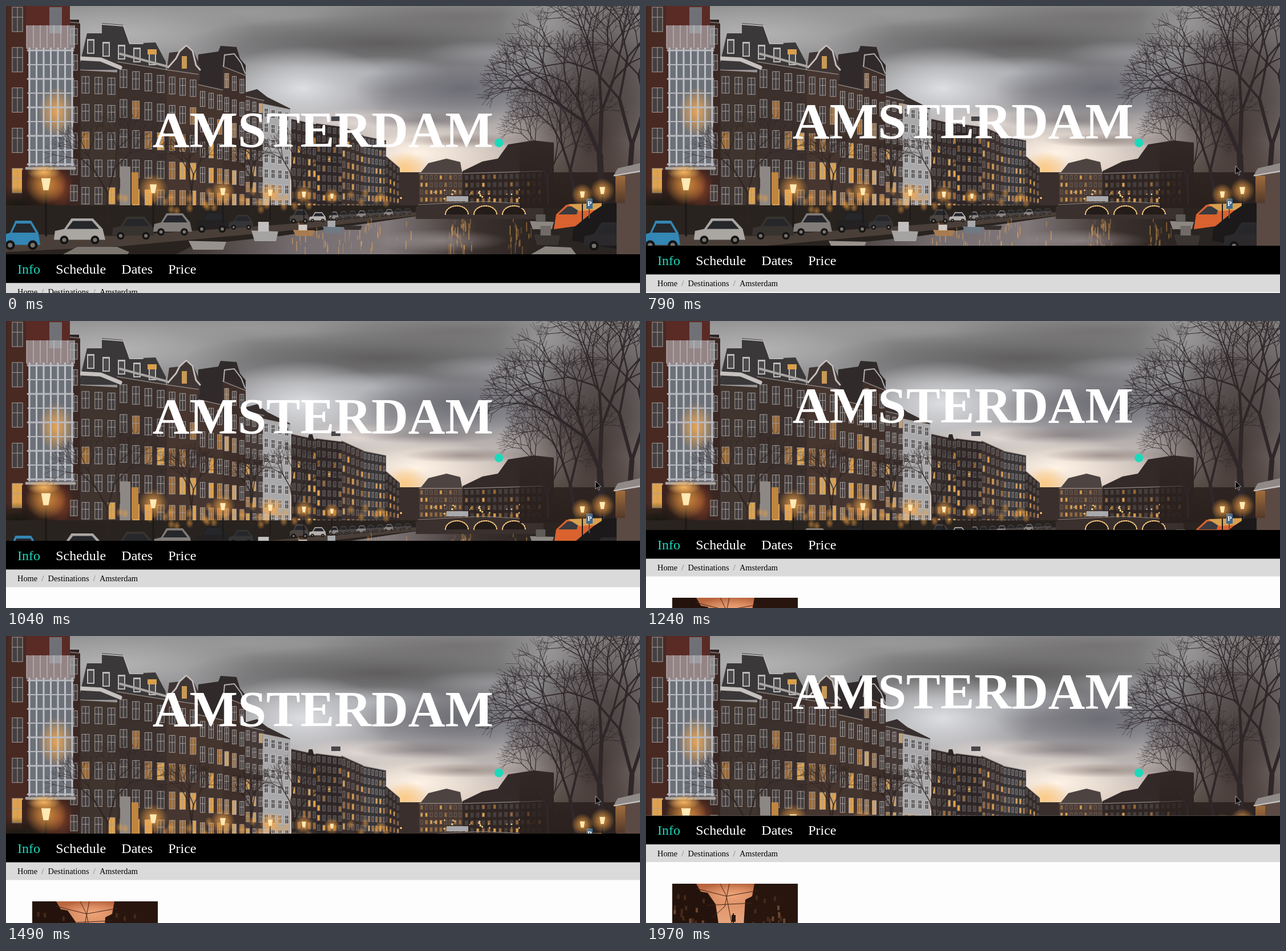
These frames come from a looping animation (1111 by 504 pixels, 2 s). An HTML page with a canvas:

```html
<!DOCTYPE html>
<html lang="en">
<head>
<meta charset="utf-8">
<title>Amsterdam</title>
<style>
  html, body { margin: 0; height: 100%; overflow: hidden; background: #fdfdfd; }
  canvas { display: block; }
</style>
</head>
<body>
<canvas id="stage" width="1111" height="504"></canvas>
<script>
const W = 1111, H = 504, LOOP = 2000, TEAL = '#1dd8bb';
const SERIF = '"Liberation Serif", "Times New Roman", serif';
const stage = document.getElementById('stage').getContext('2d');

let seed = 11;
const rnd = () => (seed = seed * 16807 % 2147483647) / 2147483647;
const lerp = (a, b, u) => a + (b - a) * u;

function layer(w, h) {
  const canvas = document.createElement('canvas');
  canvas.width = w;
  canvas.height = h;
  return canvas.getContext('2d');
}

function poly(c, fill, ...pts) {
  c.fillStyle = fill;
  c.beginPath();
  for (let i = 0; i < pts.length; i += 2) c.lineTo(pts[i], pts[i + 1]);
  c.fill();
}

function line(c, color, width, ...pts) {
  c.strokeStyle = color;
  c.lineWidth = width;
  c.beginPath();
  for (let i = 0; i < pts.length; i += 2) c.lineTo(pts[i], pts[i + 1]);
  c.stroke();
}

function rect(c, fill, x, y, w, h) {
  c.fillStyle = fill;
  c.fillRect(x, y, w, h);
}

function disc(c, fill, x, y, r) {
  c.fillStyle = fill;
  c.beginPath();
  c.arc(x, y, r, 0, 7);
  c.fill();
}

function glow(c, x, y, rx, ry, rgb, alpha) {
  const g = c.createRadialGradient(0, 0, 0, 0, 0, 1);
  g.addColorStop(0, `rgba(${rgb},${alpha})`);
  g.addColorStop(0.5, `rgba(${rgb},${alpha * 0.55})`);
  g.addColorStop(1, `rgba(${rgb},0)`);
  c.save();
  c.translate(x, y);
  c.scale(rx, ry);
  rect(c, g, -1, -1, 2, 2);
  c.restore();
}

function gradient(c, x0, y0, x1, y1, ...colors) {
  const g = c.createLinearGradient(x0, y0, x1, y1);
  colors.forEach((color, i) => g.addColorStop(i / (colors.length - 1), color));
  return g;
}

// Wall between x0 and x1 with a sloping top and a grid of framed windows; lower rows are lit.
function facade(c, x0, x1, top0, top1, bottom, fill, cols, rows, lit = 0.5, frame = '#a39c98') {
  poly(c, fill, x0, top0, x1, top1, x1, bottom, x0, bottom);
  const cw = (x1 - x0) / cols;
  for (let i = 0; i < cols; i++) {
    const x = x0 + cw * (i + 0.2), top = lerp(top0, top1, (i + 0.5) / cols);
    const rh = (bottom - top) / rows;
    for (let j = 0; j < rows; j++) {
      const y = top + rh * (j + 0.22), w = cw * 0.6, h = rh * 0.62;
      const on = rnd() < lit * (j + 0.5) / rows * 1.6;
      rect(c, frame, x, y, w, h);
      rect(c, on ? (rnd() < 0.4 ? '#e0a24c' : '#9a6a38') : '#443f40', x + 1, y + 1, w - 2, h - 2);
      if (cw > 11) {
        rect(c, frame, x + w / 2 - 0.5, y, 1, h);
        rect(c, frame, x, y + h * 0.4, w, 1);
      }
    }
  }
  line(c, 'rgba(190,180,175,.6)', 1.5, x0, top0, x1, top1);
}

function branch(c, color, x, y, angle, length, width, depth) {
  const ex = x + Math.cos(angle) * length, ey = y + Math.sin(angle) * length;
  line(c, color, width, x, y, ex, ey);
  if (!depth) return;
  const forks = depth > 3 ? 2 : 3;
  for (let i = 0; i < forks; i++) {
    const turn = (i - (forks - 1) / 2) * 0.62 + (rnd() - 0.5) * 0.5;
    branch(c, color, ex, ey, angle + turn, length * (0.7 + rnd() * 0.2), width * 0.66, depth - 1);
  }
}

function car(c, x, bottom, w, h, color) {
  const y = bottom - h;
  poly(c, color, x, bottom - h * 0.15, x + w * 0.02, y + h * 0.5, x + w * 0.2, y + h * 0.42, x + w * 0.34, y,
    x + w * 0.76, y, x + w * 0.95, y + h * 0.42, x + w, bottom - h * 0.15);
  poly(c, '#25272b', x + w * 0.25, y + h * 0.42, x + w * 0.37, y + h * 0.1, x + w * 0.74, y + h * 0.1, x + w * 0.88, y + h * 0.42);
  for (const u of [0.2, 0.8]) {
    disc(c, '#151414', x + w * u, bottom - h * 0.14, h * 0.17);
    disc(c, '#77736f', x + w * u, bottom - h * 0.14, h * 0.08);
  }
}

function boat(c, x, y, w, h, hull, cabin) {
  poly(c, hull, x, y + h * 0.45, x + w, y + h * 0.5, x + w * 0.92, y + h, x + w * 0.12, y + h);
  if (cabin) rect(c, cabin, x + w * 0.25, y, w * 0.4, h * 0.5);
}

function lamp(c, x, y, size, foot) {
  line(c, '#1d1918', size / 4, x, y, x, foot);
  glow(c, x, y, size * 2.4, size * 2.4, '255,170,70', 0.8);
  poly(c, '#ffe9b5', x - size * 0.55, y - size * 0.7, x + size * 0.55, y - size * 0.7, x + size * 0.3, y + size * 0.7, x - size * 0.3, y + size * 0.7);
}

function paintSky(c) {
  rect(c, gradient(c, 0, 0, 0, 330, '#8f8e8e', '#88888a', '#9a9a9e', '#c9bfba', '#e4cdbb'), 0, 0, W, H);
  glow(c, 190, 50, 250, 60, '190,190,191', 0.8);
  glow(c, 420, 12, 200, 26, '158,157,157', 0.7);
  glow(c, 660, 65, 350, 50, '88,86,87', 0.85);
  glow(c, 790, 18, 260, 32, '105,103,103', 0.7);
  glow(c, 960, 30, 100, 60, '160,159,160', 0.7);
  glow(c, 520, 145, 160, 75, '225,226,229', 0.95);
  glow(c, 650, 118, 130, 30, '190,193,198', 0.7);
  glow(c, 800, 145, 190, 60, '105,105,113', 0.9);
  glow(c, 850, 82, 120, 22, '165,165,170', 0.6);
  glow(c, 620, 205, 120, 26, '230,220,215', 0.9);
  glow(c, 740, 200, 130, 16, '125,118,121', 0.7);
  glow(c, 720, 258, 150, 56, '255,243,230', 1);
  glow(c, 805, 236, 110, 13, '140,126,122', 0.7);
  glow(c, 700, 285, 42, 30, '255,200,125', 0.9);
}

function paintFarBank(c) {
  rect(c, '#3a2f2c', 660, 292, 451, 80);
  poly(c, '#4d4442', 724, 296, 740, 276, 772, 268, 796, 274, 800, 296);
  facade(c, 724, 800, 294, 294, 346, '#4a3a33', 9, 4, 0.8, '#6d5c50');
  poly(c, '#332a29', 800, 290, 835, 273, 862, 268, 880, 243, 925, 236, 960, 240, 960, 350, 800, 350);
  facade(c, 802, 940, 294, 290, 348, '#2f2624', 14, 4, 0.5, '#4a3d38');
  for (let i = 0; i < 26; i++) disc(c, '#ffd28a', 690 + rnd() * 250, 322 + rnd() * 18, 0.8 + rnd());
}

function paintHouses(c) {
  facade(c, 500, 545, 198, 208, 362, '#352c2b', 5, 8, 0.6, '#6b6361');
  facade(c, 543, 590, 206, 212, 362, '#2f2727', 5, 9, 0.5, '#685f5e');
  facade(c, 588, 628, 210, 228, 362, '#3b302d', 5, 8, 0.6, '#756b68');
  facade(c, 626, 666, 228, 236, 362, '#383537', 6, 8, 0.5, '#8c8789');
  facade(c, 664, 690, 262, 284, 362, '#332a29', 4, 6, 0.6, '#5d5350');
  rect(c, '#46464b', 570, 194, 16, 8);
  poly(c, '#2d2626', 528, 210, 531, 199, 537, 199, 540, 210);

  poly(c, '#38302f', 418, 152, 440, 146, 458, 160, 498, 180, 498, 200, 418, 200);
  facade(c, 418, 452, 158, 166, 360, '#443936', 3, 7, 0.5);
  facade(c, 450, 498, 172, 182, 360, '#a9a9ab', 4, 7, 0.15, '#c9c9ca');

  poly(c, '#302a2b', 335, 140, 337, 85, 372, 80, 376, 70, 404, 72, 410, 92, 420, 104, 420, 155);
  line(c, '#b5b0ae', 2, 381, 108, 383, 86, 400, 84, 412, 100, 419, 118);
  facade(c, 337, 382, 138, 148, 362, '#45352f', 3, 5, 0.8);
  facade(c, 380, 420, 106, 122, 362, '#3f2f2a', 3, 6, 0.75);

  poly(c, '#3e3534', 282, 110, 286, 82, 304, 80, 316, 67, 328, 78, 340, 106, 340, 130, 282, 130);
  line(c, '#c4bebb', 3, 284, 108, 298, 92, 304, 80, 316, 69, 327, 79, 333, 104, 340, 112);
  rect(c, '#c99a55', 308, 88, 9, 22);
  facade(c, 282, 337, 112, 120, 362, '#473630', 3, 5, 0.9);

  poly(c, '#3a3839', 130, 100, 142, 48, 168, 48, 168, 30, 205, 33, 216, 66, 262, 64, 280, 98, 280, 112, 130, 112);
  line(c, '#b9b7b7', 2, 168, 32, 206, 35, 217, 66, 240, 66);
  for (let i = 0; i < 5; i++) {
    const x = 142 + i * 27, y = 58 + i * 5;
    rect(c, '#bdbbba', x, y, 13, 26);
    rect(c, '#4b4a4c', x + 2, y + 3, 9, 21);
  }
  rect(c, '#d9a04d', 248, 76, 16, 9);
  facade(c, 128, 196, 112, 116, 356, '#40342f', 3, 5, 0.15);
  facade(c, 195, 282, 98, 112, 362, '#3c302d', 4, 5, 0.5);
  line(c, '#c5c1be', 7, 130, 92, 166, 94, 200, 108);
  line(c, '#aaa5a2', 4, 200, 84, 282, 106);
  rect(c, '#8d8884', 200, 282, 18, 72);
  rect(c, '#c0853e', 220, 292, 12, 56);
}

function paintCornerHouse(c) {
  rect(c, '#43261f', 0, 0, 112, 350);
  rect(c, '#2b2423', 110, 24, 18, 326);
  facade(c, 108, 130, 28, 30, 350, '#3a2622', 1, 7, 0.1);
  facade(c, 4, 36, -14, -14, 340, '#492a23', 1, 5, 0.5);
  rect(c, '#5a2b25', 36, 0, 76, 80);
  rect(c, '#707176', 76, 2, 22, 46);
  rect(c, 'rgba(180,180,184,.65)', 36, 34, 84, 42);
  for (let x = 36; x <= 120; x += 12) line(c, '#c9c7c6', 1, x, 34, x, 74);
  rect(c, '#6c7079', 39, 76, 78, 206);
  glow(c, 88, 186, 32, 44, '245,170,80', 0.9);
  for (let x = 41; x <= 117; x += 12.5) line(c, '#c0c1c6', 3, x, 74, x, 280);
  for (let y = 78; y < 290; y += 25) line(c, '#b9bac0', y % 2 ? 2 : 3, 38, y, 118, y);
  line(c, '#aaa4a0', 5, 36, 285, 120, 285);
  rect(c, '#3b221d', 28, 288, 84, 62);
  glow(c, 66, 292, 30, 12, '255,200,120', 0.9);
  glow(c, 96, 320, 24, 36, '190,90,50', 0.5);
  glow(c, 20, 352, 60, 34, '22,23,18', 1);
}

function paintWater(c) {
  rect(c, '#29231f', 0, 350, W, H - 350);
  poly(c, '#4a3f38', 0, 400, 200, 404, 480, 384, 720, 362, 720, 368, 480, 396, 200, 422, 0, 432);
  poly(c, gradient(c, 200, 0, 980, 0, '#2b2421', '#4a413f', '#756d70', '#81787a', '#3a302d', '#241f1d'),
    160, H, 330, 420, 480, 404, 720, 369, 940, 369, 960, 400, 1000, H);
  glow(c, 760, 412, 120, 20, '170,160,162', 0.6);
  for (let i = 0; i < 110; i++) {
    const x = i < 45 ? 500 + rnd() * 210 : rnd() < 0.6 ? 774 + rnd() * 42 : 876 + rnd() * 44;
    rect(c, `rgba(245,175,85,${0.2 + rnd() * 0.45})`, x, 370 + rnd() * 55, 1.5, 5 + rnd() * 16);
  }
}

function paintBridge(c) {
  c.fillStyle = '#3a312f';
  c.beginPath();
  c.moveTo(718, 352);
  c.quadraticCurveTo(835, 338, 942, 352);
  c.lineTo(942, 374);
  c.lineTo(718, 374);
  c.fill();
  for (const x of [790, 840, 890]) {
    c.beginPath();
    c.ellipse(x, 366, 20, 15, 0, Math.PI, 0);
    c.fillStyle = '#241c19';
    c.fill();
    c.setLineDash([2, 2]);
    c.strokeStyle = '#ffce80';
    c.lineWidth = 2;
    c.stroke();
    c.setLineDash([]);
  }
  line(c, '#8e8580', 1, 722, 349, 835, 343, 940, 349);
  rect(c, '#a8a9ad', 772, 334, 38, 9);
}

function paintStreet(c) {
  for (let i = 0; i < 34; i++) glow(c, 190 + rnd() * 480, 325 + rnd() * 35, 7, 9, '240,160,65', 0.55);
  car(c, -6, 427, 66, 50, '#3486b4');
  car(c, 84, 417, 90, 44, '#aaa6a2');
  car(c, 186, 409, 74, 39, '#37332f');
  car(c, 258, 402, 68, 38, '#817c79');
  car(c, 331, 397, 60, 37, '#232122');
  car(c, 390, 392, 44, 25, '#353436');
  car(c, 497, 381, 34, 24, '#4b4542');
  car(c, 531, 379, 30, 17, '#b5b1ae');
  for (let i = 0; i < 9; i++) car(c, 566 + i * 16, 376 - i * 1.2, 17, 15 - i * 0.5, i % 3 ? '#4b4644' : '#8b8683');
  boat(c, 320, 400, 66, 28, '#98928d');
  boat(c, 430, 379, 47, 34, '#a5a3a1', '#c2c0be');
  boat(c, 503, 384, 38, 20, '#a87c50', '#d0cac2');
  boat(c, 555, 377, 34, 22, '#6e7a84', '#a7aaad');
  boat(c, 590, 379, 34, 14, '#37302d');
  poly(c, '#7c7670', 100, 436, 125, 423, 195, 423, 216, 432, 210, 440);
}

function paintRightBank(c) {
  const brown = '#30272a';
  glow(c, 1030, 230, 165, 190, '50,38,35', 0.9);
  glow(c, 1060, 120, 130, 170, '62,50,48', 0.6);
  rect(c, gradient(c, 0, 235, 0, 350, 'rgba(38,29,27,0)', '#2a201d'), 900, 235, 211, 120);
  branch(c, brown, 1045, 350, -1.62, 88, 11, 7);
  branch(c, brown, 1090, 340, -1.5, 95, 9, 7);
  branch(c, brown, 1000, 350, -1.75, 62, 6, 6);
  branch(c, brown, 950, 345, -1.6, 42, 4, 6);
  poly(c, '#2a2422', 935, 368, 1111, 350, 1111, H, 1000, H);
  boat(c, 918, 366, 42, 26, '#8d8782', '#5f5b59');
  boat(c, 925, 386, 46, 34, '#3a3432', '#716b67');
  poly(c, '#8b8580', 920, 436, 945, 422, 990, 424, 1002, 440);
  poly(c, '#d9622f', 960, 392, 964, 366, 982, 349, 1046, 347, 1046, 380);
  poly(c, '#3a3a3f', 968, 366, 984, 352, 1004, 352, 1000, 366);
  poly(c, '#d8a04f', 985, 348, 1046, 346, 1040, 358, 1004, 360);
  poly(c, '#1b191a', 992, 412, 994, 390, 1030, 360, 1050, 347, 1088, 345, 1088, 430);
  car(c, 1012, 428, 92, 48, '#2b292b');
  rect(c, '#5b4a43', 1070, 292, 41, 150);
  rect(c, gradient(c, 0, 295, 0, 350, '#a56f3d', '#4c3529'), 1068, 298, 17, 48);
  poly(c, '#8f8a88', 1064, 299, 1072, 285, 1111, 276, 1111, 292);
  line(c, '#c9c5c2', 2, 1066, 298, 1111, 290);
  line(c, '#55504e', 2, 1022, 350, 1022, 372);
  rect(c, '#3b6a94', 1017, 338, 11, 18);
  c.fillStyle = '#fff';
  c.font = 'bold 12px ' + SERIF;
  c.fillText('P', 1019, 351);
}

function paintPhoto() {
  const c = layer(W, 440);
  c.lineCap = 'round';
  paintSky(c);
  paintFarBank(c);
  paintHouses(c);
  paintCornerHouse(c);
  paintWater(c);
  paintBridge(c);
  for (const [x, y, size] of [[178, 380, 52], [325, 365, 38], [430, 365, 38], [505, 362, 38]])
    branch(c, 'rgba(45,36,34,.8)', x, y, -1.57, size, 4, 5);
  paintStreet(c);
  paintRightBank(c);
  for (const [x, y, size] of [[70, 313, 15], [258, 321, 11], [380, 326, 9], [463, 328, 8], [522, 331, 7], [571, 334, 6], [1010, 331, 8], [1045, 324, 9]])
    lamp(c, x, y, size, y + size * 6);
  return c.canvas;
}

function paintThumb() {
  const c = layer(220, 90);
  rect(c, gradient(c, 0, 0, 0, 90, '#b5613a', '#e29a70', '#e9ad88'), 0, 0, 220, 90);
  glow(c, 105, 20, 60, 22, '245,170,125', 0.9);
  poly(c, '#24130c', 0, 0, 42, 0, 50, 14, 62, 16, 76, 36, 84, 90, 0, 90);
  poly(c, '#27150e', 220, 0, 144, 0, 140, 22, 128, 28, 124, 90, 220, 90);
  for (let i = 0; i < 40; i++) {
    const x = i % 2 ? rnd() * 60 : 140 + rnd() * 75;
    rect(c, i % 3 ? '#46291b' : '#6b4631', x, 18 + rnd() * 68, 4, 8);
  }
  line(c, '#43251a', 1, 40, 8, 95, 22, 150, 12);
  line(c, '#43251a', 1, 84, 0, 95, 22, 108, 90);
  line(c, '#43251a', 1, 100, 0, 92, 40, 70, 60);
  line(c, '#43251a', 1, 60, 38, 140, 34);
  line(c, '#2b1710', 2, 107, 52, 107, 90);
  rect(c, '#2b1710', 104, 55, 7, 12);
  return c.canvas;
}

const photo = paintPhoto(), thumb = paintThumb();

const scrollKeys = [[560, 0], [790, 15], [1040, 50], [1240, 69], [1490, 89], [1720, 107.5], [1970, 120.5], [2200, 128]];

// Smooth cubic through the scroll keys.
function scrollAt(t) {
  if (t <= scrollKeys[0][0]) return 0;
  const slope = i => {
    if (i === 0) return 0;
    const a = scrollKeys[i - 1], b = scrollKeys[Math.min(i + 1, scrollKeys.length - 1)];
    return (b[1] - a[1]) / (b[0] - a[0]);
  };
  const i = scrollKeys.findIndex(k => k[0] > t) - 1;
  const [t0, y0] = scrollKeys[i], [t1, y1] = scrollKeys[i + 1];
  const d = t1 - t0, u = (t - t0) / d, v = 1 - u;
  return v * v * (1 + 2 * u) * y0 + u * u * (3 - 2 * u) * y1 + d * u * v * (v * slope(i) - u * slope(i + 1));
}

function words(items, x, y, size, gap) {
  stage.font = `${size}px ${SERIF}`;
  for (const [text, color] of items) {
    stage.fillStyle = color;
    stage.fillText(text, x, y);
    x += stage.measureText(text).width + gap;
  }
}

function drawCursor(t) {
  if (t < 40) return;
  const v = 1 - Math.min(1, (t - 40) / 430), e = 1 - v * v;
  stage.save();
  stage.translate(lerp(1083, 1033, e), lerp(480, 281, e));
  poly(stage, '#000', 0, 0, 0, 14, 3.3, 11, 5.6, 16, 7.6, 15, 5.4, 10.2, 9.8, 10);
  stage.closePath();
  stage.strokeStyle = '#c8c8c8';
  stage.lineWidth = 0.8;
  stage.stroke();
  stage.restore();
}

function draw(t) {
  const y = 436 - Math.round(scrollAt(t) * 2) / 2;
  stage.drawImage(photo, 0, 0);

  stage.fillStyle = '#fff';
  stage.font = `bold 89.6px ${SERIF}`;
  stage.textAlign = 'center';
  stage.fillText('AMSTERDAM', W / 2, y - 189);
  stage.textAlign = 'left';
  disc(stage, TEAL, 863.8, 240.3, 7.6);

  rect(stage, '#fdfdfd', 0, y, W, H);
  rect(stage, '#dadada', 0, y + 50, W, 31.5);
  rect(stage, '#000', 0, y, W, 50.4);
  words([['Info', TEAL], ['Schedule', '#fff'], ['Dates', '#fff'], ['Price', '#fff']], 20, y + 33.5, 24, 27.2);
  words([['Home', '#000'], ['/', '#6c757d'], ['Destinations', '#000'], ['/', '#6c757d'], ['Amsterdam', '#000']], 20, y + 71, 14.4, 7.2);
  stage.drawImage(thumb, 46, Math.round(y + 119.2));
  drawCursor(t);
}

function tick() {
  draw(performance.now() % LOOP);
  requestAnimationFrame(tick);
}
tick();
</script>
</body>
</html>
```
